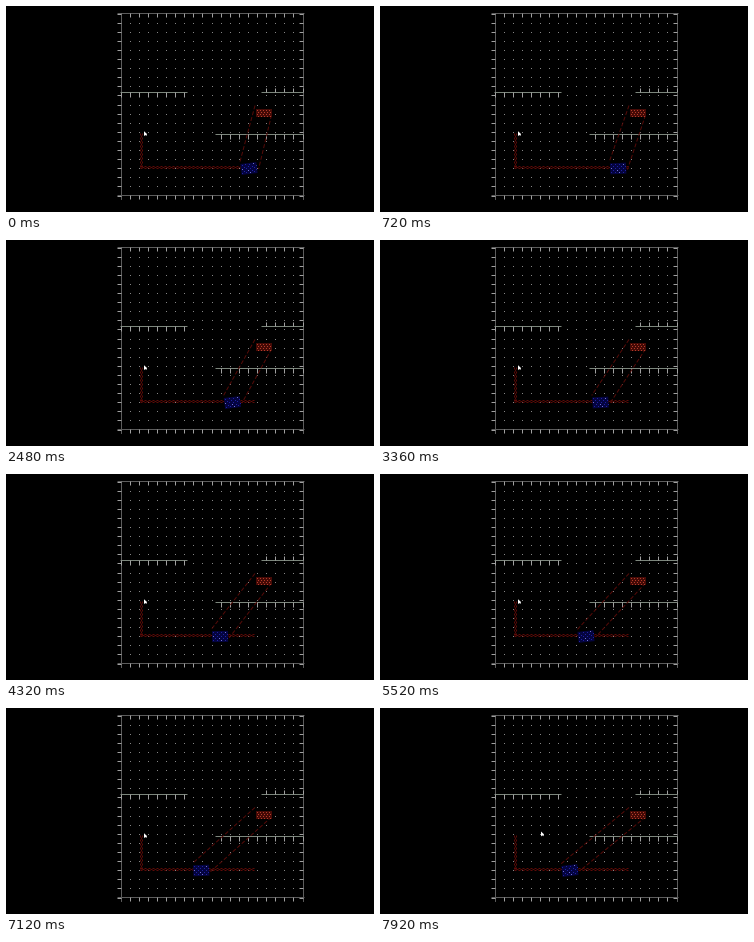
A matplotlib script that plays this animation: 368 px wide and 206 px high, repeating every 8 s.

```python
import numpy as np
import matplotlib.pyplot as plt
from matplotlib.animation import FuncAnimation
from matplotlib.patches import Polygon

W, H = 368, 206
FRAMES, STEP = 100, 80
LEFT, TOP, CELL, CELLS = 114, 7, 9.1, 20
RIGHT, BOTTOM = LEFT + CELL * CELLS + 0.5, TOP + CELL * CELLS - 0.5
EDGE, TICK, DOT = "#5c5c5c", "#a0a0a0", "#858585"
WALL, RED, SIGHT = "#7c867c", "#5c0a07", "#560b08"
ROVER_Y = 162.5

plt.rcParams["toolbar"] = "None"
fig = plt.figure(figsize=(W / 100, H / 100), dpi=100, facecolor="black")
ax = fig.add_axes([0, 0, 1, 1])
ax.set_xlim(0, W)
ax.set_ylim(H, 0)
ax.axis("off")


def line(xs, ys, color, **style):
    return ax.plot(xs, ys, color=color, lw=0.72, solid_capstyle="butt",
                   dash_capstyle="butt", **style)[0]


def pixels(xs, ys, color, z=2):
    return ax.plot(xs, ys, ls="", marker="s", ms=0.72, mew=0,
                   color=color, zorder=z)[0]


def comb(x0, x1, y, tick, color=EDGE):
    """Horizontal rule with a tick at every grid column."""
    line([x0, x1], [y, y], color)
    for x in columns[(columns >= x0 - 1) & (columns <= x1 + 1)]:
        line([x, x], [y, y + tick], TICK)


def side(x, tick):
    line([x, x], [TOP, BOTTOM + 4], EDGE)
    for y in rows:
        line([x, x + tick], [y, y], TICK)


def turn(points, angle):
    c, s = np.cos(angle), np.sin(angle)
    return points @ np.array([[c, s], [-s, c]])


def box(cx, cy, w, h, angle=0):
    corners = np.array([[-w, -h], [w, -h], [w, h], [-w, h]]) / 2
    return turn(corners, angle) + (cx, cy)


def speckle(w, h, pitch):
    """Staggered dots filling a box centred on the origin."""
    return np.array([(x + (j % 2) * pitch / 2, y)
                     for j, y in enumerate(np.arange(-h / 2 + 1, h / 2, 2))
                     for x in np.arange(-w / 2 + 1, w / 2 - 1, pitch)])


columns = np.floor(LEFT + CELL * np.arange(CELLS + 1)) + 0.5
rows = np.floor(TOP + CELL * np.arange(CELLS + 1)) + 0.5

gx, gy = np.meshgrid(columns, rows)
pixels(gx.ravel(), gy.ravel(), DOT, z=1)

comb(111, RIGHT + 1, TOP - 0.5, 4)
comb(111, RIGHT + 1, BOTTOM, 4)
side(LEFT + 0.5, -4)
side(RIGHT, -4)

comb(114, 181, 85.5, 5, WALL)
comb(255, 297, 85.5, -4, WALL)
comb(209, 297, 127.5, 5, WALL)

# Route drawn as three staggered rows of short dashes
for row in range(3):
    dash = (row * 2, (2, 2))
    line([133.5 + row, 133.5 + row], [127, 162], RED, ls=dash)
    line([134, 248], [159.5 + row, 159.5 + row], RED, ls=dash)

ax.add_patch(Polygon(box(257.5, 106.5, 16, 8), fc="#450a06", ec="none",
                     zorder=3))
dots = speckle(16, 8, 3) + (257.5, 106.5)
pixels(dots[:, 0], dots[:, 1], "#b03c2a", z=4)

sight = [line([], [], SIGHT, ls=(0, (4, 2))) for _ in range(2)]
rover = ax.add_patch(Polygon(box(243, ROVER_Y, 16, 11), fc="#040440",
                             ec="none", zorder=3))
texture = speckle(16, 11, 4)
rover_dots = pixels([], [], "#2020a0", z=4)
glints = pixels([], [], "#7070d0", z=5)
arrow = np.array([[0, 0], [0, 5], [1.2, 3.8], [2.4, 4.8], [3, 2.8]])
cursor = ax.add_patch(Polygon(arrow, fc="white", ec="none", zorder=6))


def draw(i):
    t = i * STEP / 1000
    x = 243 - 6.7 * t
    angle = -0.12 * (0.5 + 0.5 * np.cos(2 * np.pi * i / 33))
    body = box(x, ROVER_Y, 16, 11, angle)
    rover.set_xy(body)
    points = turn(texture, angle) + (x, ROVER_Y)
    rover_dots.set_data(points[:, 0], points[:, 1])
    glints.set_data(points[3::5, 0], points[3::5, 1])
    sight[0].set_data([249, body[0, 0] - 0.5], [99.5, body[0, 1] - 2])
    sight[1].set_data([265.5, body[2, 0] + 1], [109, body[2, 1] - 4])

    p = np.clip((t - 7.44) / 0.48, 0, 1)
    p = p * p * (3 - 2 * p)
    cursor.set_xy(arrow + (138 + 23 * p, 125.2 - 1.7 * p))
    return [rover, rover_dots, glints, *sight, cursor]


animation = FuncAnimation(fig, draw, frames=FRAMES, interval=STEP,
                          repeat=True, repeat_delay=0, blit=False)
plt.show()
```
